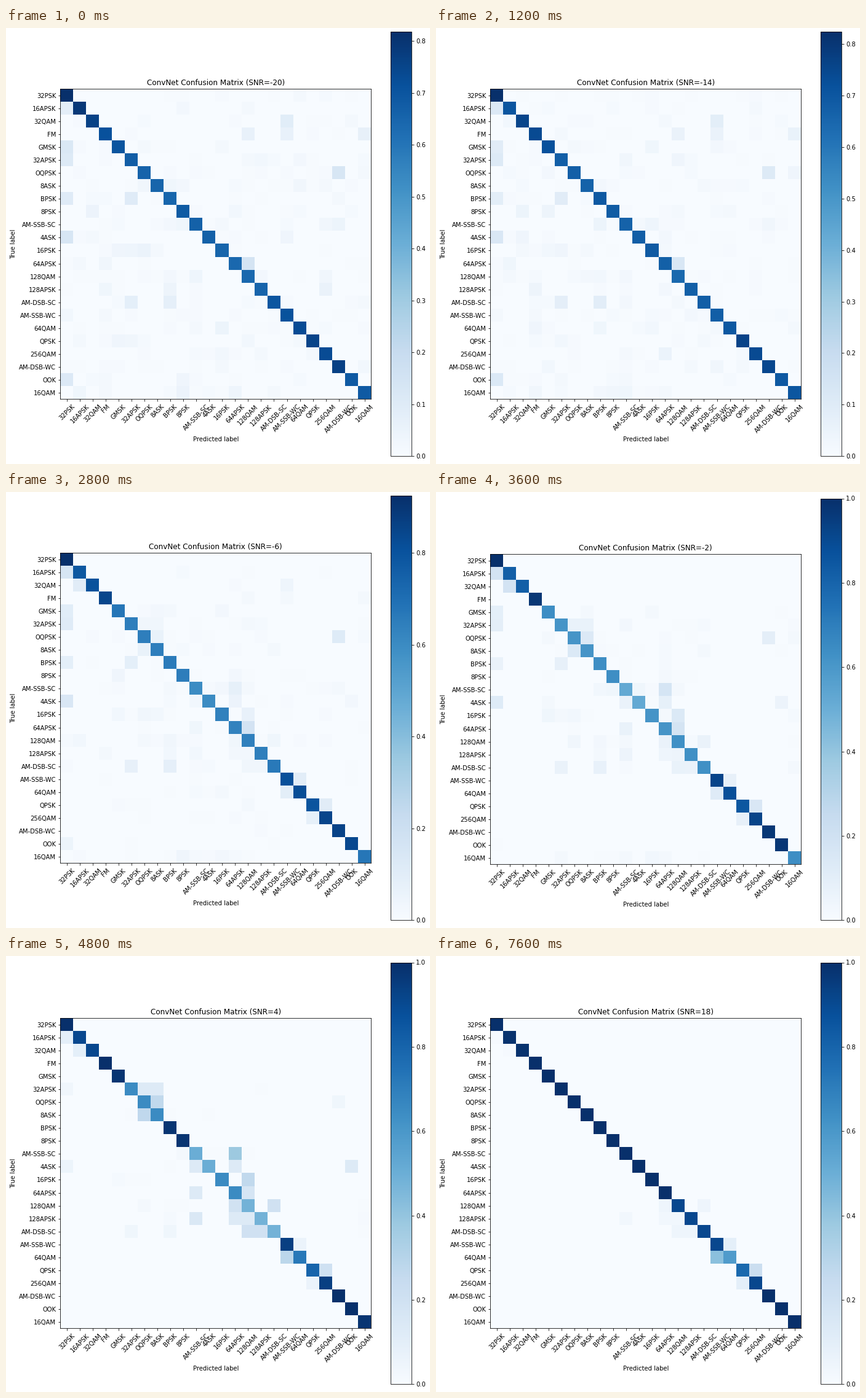
A matplotlib script for the animation above (8 s loop, 689 by 710 pixels).

```python
import numpy as np
import matplotlib.pyplot as plt
from matplotlib.animation import FuncAnimation

W, H, DPI = 689, 710, 72
plt.rcParams.update({"font.family": "DejaVu Sans", "font.size": 10})

LABELS = """32PSK 16APSK 32QAM FM GMSK 32APSK OQPSK 8ASK BPSK 8PSK AM-SSB-SC 4ASK
16PSK 64APSK 128QAM 128APSK AM-DSB-SC AM-SSB-WC 64QAM QPSK 256QAM AM-DSB-WC
OOK 16QAM""".split()
N = len(LABELS)
INDEX = np.arange(N)

# Recall of each group of classes at four SNR levels.
LEVELS = [-2, 4, 10, 18]
GROUPS = {
    "32PSK FM AM-DSB-WC OOK": (0.97, 1, 1, 1),
    "16APSK 32QAM": (0.82, 0.91, 0.98, 0.99),
    "GMSK BPSK 8PSK 16QAM": (0.64, 0.98, 1, 1),
    "32APSK OQPSK 8ASK 16PSK 64APSK": (0.61, 0.65, 0.98, 1),
    "AM-SSB-SC 4ASK": (0.52, 0.5, 0.96, 1),
    "128QAM 128APSK AM-DSB-SC": (0.63, 0.48, 0.87, 0.91),
    "AM-SSB-WC 256QAM": (0.92, 0.94, 0.91, 0.91),
    "64QAM": (0.88, 0.72, 0.59, 0.58),
    "QPSK": (0.85, 0.8, 0.78, 0.78),
}

# True class -> classes it is taken for, in a noisy and in a clear signal.
NOISY_GUESSES = {
    "16APSK": "32PSK", "32QAM": "AM-SSB-WC", "FM": "128QAM AM-SSB-WC 16QAM",
    "GMSK": "32PSK", "32APSK": "32PSK", "OQPSK": "AM-DSB-WC",
    "BPSK": "32PSK 32APSK", "4ASK": "32PSK", "64APSK": "128QAM",
    "AM-DSB-SC": "BPSK 32APSK", "OOK": "32PSK",
}
LOOKALIKES = {
    "16APSK": "32PSK", "32QAM": "16APSK", "32APSK": "OQPSK 8ASK",
    "OQPSK": "8ASK", "8ASK": "OQPSK", "AM-SSB-SC": "64APSK",
    "4ASK": "AM-SSB-SC 64APSK OOK", "16PSK": "128QAM",
    "64APSK": "128QAM AM-SSB-SC", "128QAM": "AM-DSB-SC 64APSK",
    "128APSK": "64APSK 128QAM AM-SSB-SC", "AM-DSB-SC": "128QAM 128APSK",
    "AM-SSB-WC": "64QAM", "64QAM": "AM-SSB-WC",
    "QPSK": "256QAM", "256QAM": "QPSK",
}


def links(guesses):
    matrix = np.zeros((N, N))
    for true, predicted in guesses.items():
        for name in predicted.split():
            matrix[LABELS.index(true), LABELS.index(name)] = 1
    return matrix


GUESSES = links(NOISY_GUESSES)
SIMILAR = links(LOOKALIKES)
SIMILAR /= np.maximum(SIMILAR.sum(axis=1, keepdims=True), 1)
CLUSTER = ((INDEX >= 4) & (INDEX <= 16)) | (INDEX >= 22)
CURVES = {name: curve for names, curve in GROUPS.items()
          for name in names.split()}
FIXED = np.random.default_rng(11).random((N, N))


def peak(snr):
    return np.interp(snr, [-20, -16, -10, -8, -2],
                     [0.818, 0.8013, 0.867, 0.886, 1])


def recall(snr, rng):
    noisy = (0.66 + 0.16 * np.exp(-INDEX / 2.5)
             + 0.1 * np.exp(-((INDEX - 19.5) / 3) ** 2)
             + rng.normal(0, 0.02, N))
    values = np.array([np.interp(snr, [-10, *LEVELS], [start, *CURVES[name]])
                       for start, name in zip(noisy, LABELS)])
    values[0] = peak(snr)
    return np.minimum(values, peak(snr))


def confusion(snr):
    """Share each class's missed recall between chance and lookalikes."""
    rng = np.random.default_rng(snr + 40)
    hits = recall(snr, rng)
    settled = np.interp(snr, [-10, -2], [0, 1])
    clarity = np.where(CLUSTER, np.interp(snr, [-10, -2, 4, 12],
                                          [0, 0.35, 0.75, 1]), settled)[:, None]

    chance = 0.6 * (0.6 * FIXED + 0.4 * rng.random((N, N))) ** 5
    chance *= np.where(CLUSTER, 1, 1 - settled)
    chance += 1.5 * GUESSES
    chance /= chance.sum(axis=1, keepdims=True) + 1.5

    matrix = (1 - hits)[:, None] * ((1 - clarity) * chance + clarity * SIMILAR)
    np.fill_diagonal(matrix, hits)
    return matrix


def place(axes, left, top, width, height):
    axes.set_position([left / W, 1 - (top + height) / H, width / W, height / H])


fig = plt.figure(figsize=(W / DPI, H / DPI), dpi=DPI, facecolor="white")
ax = fig.add_axes([0.1, 0.1, 0.7, 0.7])
cax = fig.add_axes([0.9, 0.1, 0.05, 0.8])
image = ax.imshow(confusion(-20), cmap="Blues", interpolation="nearest",
                  vmin=0, vmax=peak(-20), aspect="auto")
fig.colorbar(image, cax=cax)
ax.set_xticks(range(N), LABELS, rotation=45)
ax.set_yticks(range(N), LABELS)
ax.set_xlabel("Predicted label")
ax.set_ylabel("True label")
title = ax.set_title("", fontsize=12)

BAR_TOP, BAR_BOTTOM, SIDE = 6.2, 697.4, 504.98


def draw(frame):
    snr = -20 + 2 * frame
    vmax = peak(snr)
    image.set_data(confusion(snr))
    image.set_clim(0, vmax)
    title.set_text(f"ConvNet Confusion Matrix (SNR={snr})")

    # The bar shrinks when its top tick label would leave the margin.
    step = 0.1 if vmax < 0.9 else 0.2
    gap = (vmax - step * np.floor(vmax / step + 1e-9)) / vmax * 691
    bar_top = max(BAR_TOP, 10.5 - gap)
    place(cax, 625.3, bar_top, 33.9, BAR_BOTTOM - bar_top)
    place(ax, 88.3, 99.48 + (bar_top - BAR_TOP) // 2, SIDE, SIDE)
    return image, title


animation = FuncAnimation(fig, draw, frames=20, interval=400,
                          repeat=True, repeat_delay=0, blit=False)
plt.show()
```
